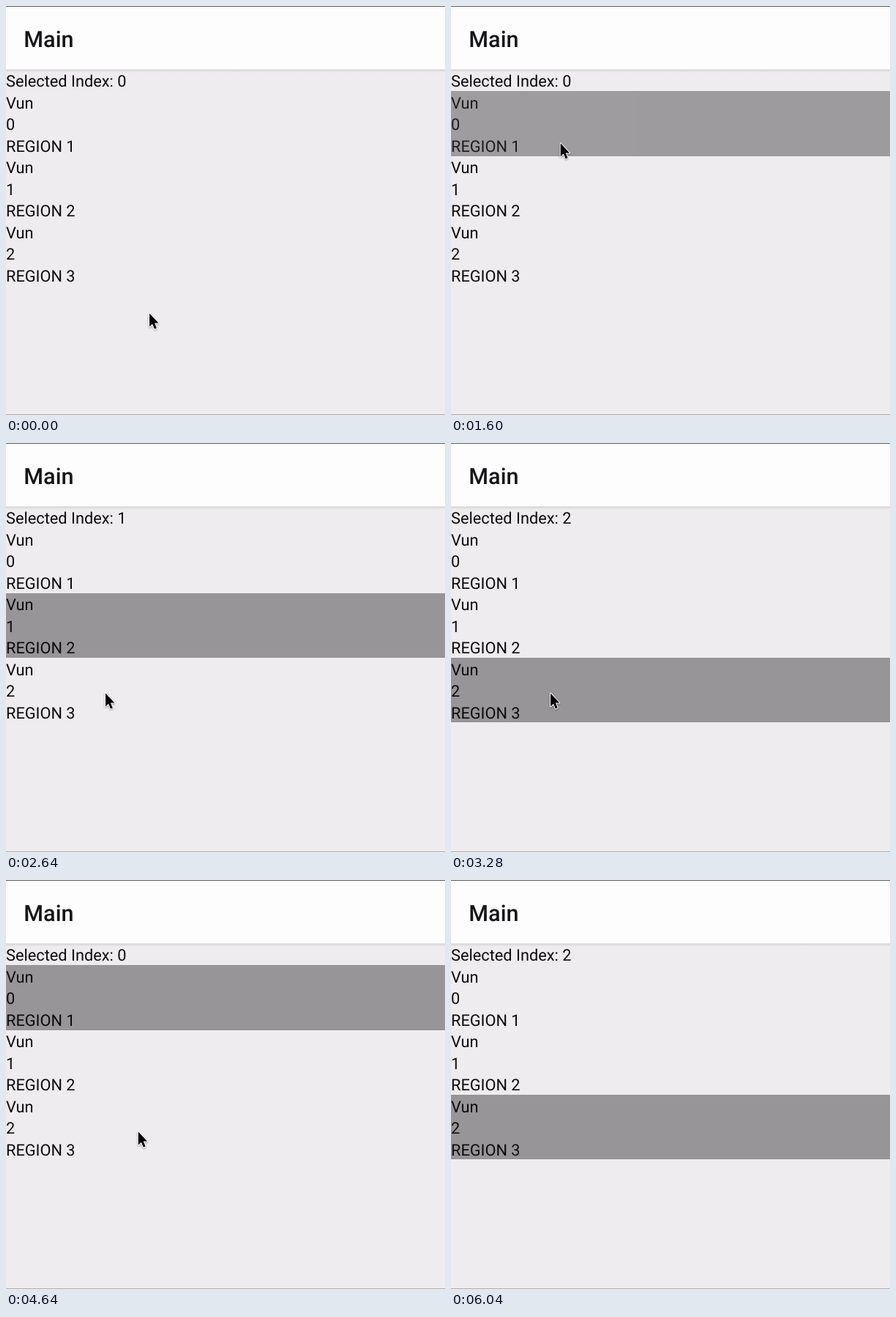
Recreate the animation shown at these times as an HTML page. Size 600 by 558 pixels, loop 6.92 s.

```html
<!DOCTYPE html>
<html lang="en">
<head>
<meta charset="utf-8">
<title>Main</title>
<style>
  html, body { margin: 0; width: 100%; height: 100%; overflow: hidden; background: #eeecee; }
  svg { display: block; width: 600px; height: 558px; }
  text {
    font: 21.75px Roboto, "Noto Sans", sans-serif;
    fill: #0c0b0c;
    text-rendering: geometricPrecision;
  }
  .title { font-size: 30.6px; font-weight: 500; fill: #161518; }
  .cursor { filter: drop-shadow(0 1.5px 1.2px rgba(0, 0, 0, .35)); }
</style>
</head>
<body>
<svg viewBox="0 0 600 558">
  <defs>
    <linearGradient id="shade" x2="0" y2="1">
      <stop offset="0" stop-color="#d2d0d2"/>
      <stop offset="1" stop-color="#eeecee"/>
    </linearGradient>
  </defs>
  <rect width="600" height="558" fill="#eeecee"/>
  <rect y="86" width="600" height="5" fill="url(#shade)"/>
  <rect width="600" height="86.5" fill="#fefdfe"/>
  <rect width="600" height="1" fill="#5e5d5f"/>
  <rect y="557" width="600" height="1" fill="#b0aeb0"/>
  <text class="title" x="24.3" y="56">Main</text>
  <text id="label" x="0" y="110.4">Selected Index: 0</text>
  <g id="list"></g>
  <circle id="ring" r="31" fill="none" stroke="#1a1a1a" stroke-width="3"/>
  <g id="cursor" class="cursor">
    <path d="M.8 1.5V19.6L4.8 15.7L7.8 22.6L10.6 21.4L7.7 14.6H13.2Z"
          fill="#000" stroke="#fff" stroke-width="2" stroke-linejoin="round" paint-order="stroke"/>
  </g>
</svg>
<script>
const LOOP = 6920, STEP = 40, FADE = 200;
const TOP = 116.2, ROW = 29.47, ITEM = 3 * ROW;
const $ = id => document.getElementById(id);
const [label, list, ring, cursor] = ['label', 'list', 'ring', 'cursor'].map($);

// each move glides to a point; some end in a tap on an item
const origin = { x: 195.3, y: 418 };
const moves = [
  { from: 0,    to: 290,  x: 129.5, y: 232, tap: { down: 320,  up: 480,  item: 1 } },
  { from: 680,  to: 1080, x: 149,   y: 182, tap: { down: 1280, up: 1440, item: 0 } },
  { from: 1560, to: 1880, x: 147,   y: 270, tap: { down: 1920, up: 2080, item: 1 } },
  { from: 2120, to: 2510, x: 135.2, y: 340, tap: { down: 2840, up: 3000, item: 2 } },
  { from: 3280, to: 4040, x: 197.5, y: 197, tap: { down: 4160, up: 4240, item: 0 } },
  { from: 4340, to: 4640, x: 180,   y: 342, tap: { down: 4920, up: 5080, item: 2 } },
  { from: 5400, to: 5720, x: 175,   y: 491 },
  { from: 5920, to: 6040, x: 13,    y: 562 }
];
const taps = moves.filter(m => m.tap).map(m => m.tap);

const clamp = p => Math.min(1, Math.max(0, p));
const smooth = p => p * p * (3 - 2 * p);

const items = [0, 1, 2].map(i => {
  const top = TOP + i * ITEM;
  const y0 = Math.round(top), y1 = Math.round(top + ITEM);
  const rows = ['Vun', i, 'REGION ' + (i + 1)];
  const g = document.createElementNS('http://www.w3.org/2000/svg', 'g');
  g.innerHTML = `<rect y="${y0}" width="600" height="${y1 - y0}" fill="#979597"/>` +
    rows.map((s, k) => `<text x="0" y="${top + 23.7 + k * ROW}">${s}</text>`).join('');
  list.append(g);
  return { g, bar: g.firstChild };
});

function pointer(t) {
  return moves.reduce((at, m) => {
    const e = smooth(clamp((t - m.from) / (m.to - m.from)));
    return { x: at.x + (m.x - at.x) * e, y: at.y + (m.y - at.y) * e };
  }, origin);
}

const show = (el, on) => { el.style.visibility = on ? 'visible' : 'hidden'; };

function draw(t) {
  const { x, y } = pointer(t);
  cursor.setAttribute('transform', `translate(${x} ${y})`);
  ring.setAttribute('transform', `translate(${x} ${y + 2})`);
  show(ring, taps.some(({ down, up }) => t >= down && t < up));

  const last = taps.filter(({ up }) => t >= up).pop();
  label.textContent = 'Selected Index: ' + (last ? last.item : 0);
  items.forEach(({ g, bar }, i) => {
    const on = !!last && last.item === i;
    show(bar, on);
    g.style.opacity = on ? .2 + .8 * smooth(clamp((t - last.up) / FADE)) : 1;
  });
}

const start = performance.now();
function tick() {
  const t = (performance.now() - start) % LOOP;
  draw(Math.floor(t / STEP) * STEP);
  requestAnimationFrame(tick);
}
tick();
</script>
</body>
</html>
```
